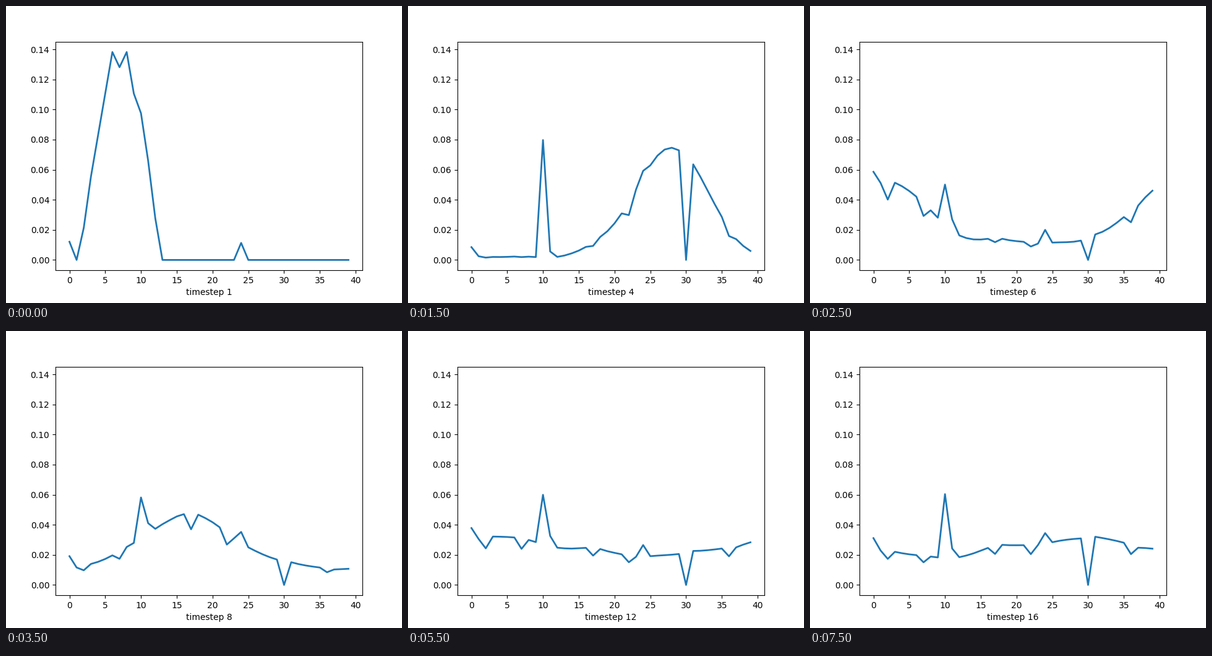
These frames come from a looping animation (640x480 px, 8000 ms). A matplotlib script:

```python
import numpy as np
import matplotlib.pyplot as plt
from matplotlib.animation import FuncAnimation

SIZE = 40             # squares on the board
STEPS = 16
JAIL, GO_TO_JAIL = 10, 30
CARD_SQUARES = [2, 7, 17, 22, 36]
CARD_TARGETS = [0, 24, 11, JAIL]
CARD_CHANCE = 1 / 16
TRIPLE_DOUBLE = 1 / 216


def take_turn(prob):
    """Advance the position distribution by one roll of two dice."""
    new = np.zeros(SIZE)
    for a in range(1, 7):
        for b in range(1, 7):
            new += np.roll(prob, a + b) / 36

    # each card is tried in turn on whoever still stands on the square
    for square in CARD_SQUARES:
        for target in CARD_TARGETS:
            moved = new[square] * CARD_CHANCE
            new[square] -= moved
            new[target] += moved

    new[JAIL] += new[GO_TO_JAIL]
    new[GO_TO_JAIL] = 0
    new *= 1 - TRIPLE_DOUBLE
    new[JAIL] += TRIPLE_DOUBLE
    return new


prob = np.zeros(SIZE)
prob[0] = 1
history = []
for _ in range(STEPS):
    prob = take_turn(prob)
    history.append(prob)

fig, ax = plt.subplots(figsize=(6.4, 4.8), dpi=100)
line, = ax.plot(np.arange(SIZE), history[0], lw=2)


def update(i):
    line.set_ydata(history[i])
    ax.set_xlabel(f"timestep {i + 1}")
    return line,


anim = FuncAnimation(fig, update, frames=STEPS, interval=500,
                     repeat=True, repeat_delay=0)
plt.show()
```
